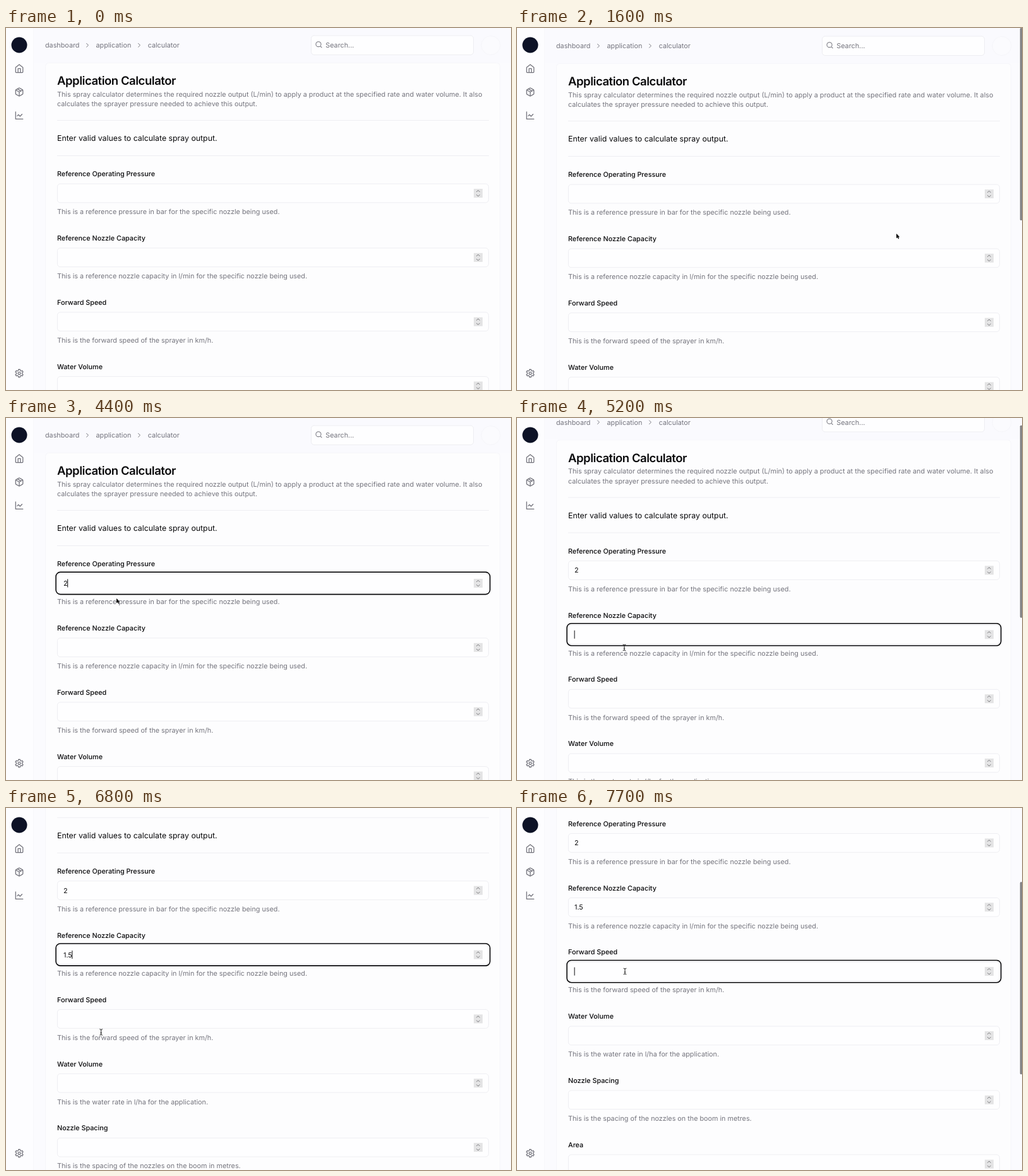
An HTML page for the animation above (8 s loop, 800x574 px).

```html
<!DOCTYPE html>
<html lang="en">
<head>
<meta charset="utf-8">
<title>Application Calculator</title>
<style>
  html, body { margin: 0; width: 100%; height: 100%; overflow: hidden; background: #fbfbfe; }
  svg { display: block; width: 100%; height: 100%; }
  text { font: 400 10.79px Inter, sans-serif; fill: #09090b; text-rendering: geometricPrecision; white-space: pre; }
  .muted { fill: #74747d; }
  .label { font-weight: 500; }
  .lead { font-size: 12.33px; }
  .title { font-size: 18.5px; font-weight: 600; letter-spacing: -.025em; }
  .icon { fill: none; stroke: #71717a; stroke-width: 2; stroke-linecap: round; stroke-linejoin: round; }
  .edge { fill: #fefeff; stroke: #eeeef2; }
  .rule { stroke: #eeeef2; }
</style>
</head>
<body>
<svg id="stage" viewBox="0 0 800 574">
  <rect width="800" height="574" fill="#fbfbfe"/>
  <g id="page">
    <rect x="43" y="-20" width="757" height="75" fill="#fafafe"/>
    <rect x="62.5" y="55.5" width="720" height="1000" rx="5" fill="#fdfdfe" stroke="#f6f6fa"/>
    <rect class="edge" x="483.5" y="12" width="257" height="30.5" rx="4.6"/>
    <circle cx="768" cy="27.5" r="15" fill="#fbfbfe" stroke="#f6f6fa"/>
    <text class="muted" x="62" y="31.2">dashboard</text>
    <text class="muted" x="142.5" y="31.2">application</text>
    <text class="muted" x="224.7" y="31.2">calculator</text>
    <text class="muted" x="506.3" y="31.2">Search...</text>
    <text class="title" x="81" y="90.3">Application Calculator</text>
    <text class="muted" x="81" y="108.9">This spray calculator determines the required nozzle output (L/min) to apply a product at the specified rate and water volume. It also</text>
    <text class="muted" x="81" y="124.4">calculates the sprayer pressure needed to achieve this output.</text>
    <path class="rule" d="M81 146.5H765M81 202.5H765"/>
    <text class="lead" x="81" y="179.4">Enter valid values to calculate spray output.</text>
    <g id="fields"></g>
    <rect id="ring" x="79.1" width="687.6" height="35.2" rx="7" fill="none" stroke="#09090b" stroke-width="1.6"/>
    <rect id="caret" width="1" height="13" fill="#09090b"/>
  </g>
  <rect width="43" height="574" fill="#fdfdff"/>
  <path d="M43.5 0V574" stroke="#f7f7fb"/>
  <circle cx="21" cy="27" r="12.5" fill="#0d1226"/>
  <g id="sidebar"></g>
  <rect id="thumb" x="796.8" width="4" height="305" rx="1.6" fill="#858587"/>
  <g id="pointer" stroke-linejoin="round">
    <path id="arrow" transform="scale(.88)" d="M0 0V8.6L2 6.8 3.5 9.8 4.9 9.1 3.5 6.3H6Z" fill="#000" stroke="#fff" stroke-width=".7" paint-order="stroke"/>
    <path id="beam" d="M-2.3-4.8Q0-4.8 0-3.4Q0-4.8 2.3-4.8M0-3.8V3.8M-2.3 4.8Q0 4.8 0 3.4Q0 4.8 2.3 4.8M-1.2 1.2H1.2" fill="none" stroke="#222"/>
  </g>
</svg>
<script>
const $ = id => document.getElementById(id);
const LOOP = 8000, STEP = 100, KEY_DELAY = 200, BLINK = 600, TRAVEL = 400;
const fieldY = i => 262 + i * 101.85;

const fields = [
  { label: 'Reference Operating Pressure', hint: 'This is a reference pressure in bar for the specific nozzle being used.',
    focusAt: 3600, typeAt: 4200, text: '2' },
  { label: 'Reference Nozzle Capacity', hint: 'This is a reference nozzle capacity in l/min for the specific nozzle being used.',
    focusAt: 5000, typeAt: 6200, text: '1.5' },
  { label: 'Forward Speed', hint: 'This is the forward speed of the sprayer in km/h.', focusAt: 7600 },
  { label: 'Water Volume', hint: 'This is the water rate in l/ha for the application.' },
  { label: 'Nozzle Spacing', hint: 'This is the spacing of the nozzles on the boom in metres.' },
  { label: 'Area', hint: 'This is the area to be sprayed in hectares.' }
];
$('fields').innerHTML = fields.map(({ label, hint }, i) => `
  <g transform="translate(0 ${fieldY(i)})">
    <text class="label" x="81" y="-26.7">${label}</text>
    <rect class="edge" x="81.4" y="-14.9" width="683" height="29.8" rx="4.6"/>
    <text class="value" x="91" y="4"></text>
    <rect x="741" y="-7" width="14" height="14" fill="#e4e4e5"/>
    <path d="M745.2-2l2.7-2.7 2.7 2.7M745.2 2.2l2.7 2.7 2.7-2.7" fill="none" stroke="#77777a"/>
    <text class="muted" x="81" y="33.4">${hint}</text>
  </g>`).join('');
const values = [...document.querySelectorAll('.value')];

// Icons live on a 24-unit grid, centred on (x, y).
const icon = (x, y, size, d) =>
  `<path class="icon" transform="translate(${x} ${y}) scale(${size / 24}) translate(-12 -12)" d="${d}"/>`;

function gearPath() {
  const halfTooth = [[12, 10], [16, 7.9], [29, 6.9]];
  const profile = [...halfTooth.map(([deg, r]) => [-deg, r]).reverse(), ...halfTooth];
  const points = [];
  for (let tooth = 0; tooth < 6; tooth++)
    for (const [deg, r] of profile) {
      const a = (tooth * 60 + deg - 90) * Math.PI / 180;
      points.push(`${12 + r * Math.cos(a)} ${12 + r * Math.sin(a)}`);
    }
  return `M${points.join('L')}ZM9 12a3 3 0 1 0 6 0a3 3 0 1 0-6 0`;
}

const chevron = 'm9 18 6-6-6-6';
$('page').insertAdjacentHTML('beforeend',
  icon(129, 27.3, 11.5, chevron) + icon(211, 27.3, 11.5, chevron) +
  icon(495.5, 26.3, 12.2, 'M3 11a8 8 0 1 0 16 0a8 8 0 1 0-16 0M21 21l-4.3-4.3'));
$('sidebar').innerHTML = [
  'm3 9 9-7 9 7v11a2 2 0 0 1-2 2H5a2 2 0 0 1-2-2zM9 22V12h6v10',
  'M7.5 4.3l9 5.1M11 2.3L4 6.3Q3 7 3 8v8q0 1 1 1.7l7 4q1 .5 2 0l7-4q1-.7 1-1.7V8q0-1-1-1.7l-7-4q-1-.5-2 0M3.3 7l8.7 5 8.7-5M12 22V12',
  'M3 3v18h18M19 9l-5 5-4-4-3 3'
].map((d, i) => icon(21, 64.3 + i * 37.2, 15.3, d)).join('') + icon(21, 547.5, 15.3, gearPath());

const progress = (t, from, to) => Math.min(1, Math.max(0, (t - from) / (to - from)));
const smooth = k => k * k * (3 - 2 * k);
const settle = k => 1 - (1 - k) ** 4.5;
const show = (id, on) => $(id).setAttribute('visibility', on ? 'visible' : 'hidden');

// A small overscroll bounce, a smooth scroll, then a quick flick.
function scrollAt(t) {
  const bounce = t >= 1200 && t < 2000 ? 4 * Math.exp((1200 - t) / 290) : 0;
  return 131.3 * smooth(progress(t, 5000, 5800)) + 75.3 * settle(progress(t, 6900, 7500)) - bounce;
}
function thumbOpacity(t) {
  const lit = (from, to) => t < from ? 0 : 1 - progress(t, to, to + 300);
  return Math.max(lit(1200, 2200), lit(5000, 6200), lit(7000, LOOP));
}

// Stops of the pointer, each reached after a short eased move.
const stops = [
  { at: 1100, x: 601, y: 326 }, { at: 2400, x: 243, y: 185 },
  { at: 3400, x: 167, y: 262 }, { at: 4400, x: 175, y: 286 },
  { at: 4800, x: 170, y: 364 }, { at: 5800, x: 145, y: 362 },
  { at: 7100, x: 181, y: 320 }, { at: 7700, x: 171, y: 259 }
];
function pointerAt(t) {
  return stops.reduce((p, { at, x, y }) => {
    const k = smooth(progress(t, at - TRAVEL, at));
    return { x: p.x + (x - p.x) * k, y: p.y + (y - p.y) * k };
  }, { x: 470, y: 400 });
}

function render(t) {
  const scroll = scrollAt(t);
  $('page').setAttribute('transform', `translate(0 ${-scroll})`);
  $('thumb').setAttribute('y', Math.max(0, scroll * .568));
  $('thumb').setAttribute('opacity', thumbOpacity(t));

  let active = -1, caretSince = 0, typing = false;
  fields.forEach(({ focusAt, typeAt, text = '' }, i) => {
    const typed = t >= typeAt ? Math.min(text.length, Math.floor((t - typeAt) / KEY_DELAY) + 1) : 0;
    values[i].textContent = text.slice(0, typed);
    typing ||= t >= typeAt && t < typeAt + text.length * KEY_DELAY;
    if (t >= focusAt) {
      active = i;
      caretSince = typed ? typeAt + (typed - 1) * KEY_DELAY : focusAt;
    }
  });

  const focused = active >= 0;
  show('ring', focused);
  show('caret', focused && (t - caretSince) % (2 * BLINK) < BLINK);
  if (focused) {
    const y = fieldY(active), value = values[active];
    $('ring').setAttribute('y', y - 17.6);
    $('caret').setAttribute('y', y - 6.5);
    $('caret').setAttribute('x', 90.6 + (value.textContent ? value.getComputedTextLength() : 0));
  }

  const { x, y } = pointerAt(t);
  const visible = t >= 300 && !typing;
  const overText = t >= 3300 && (t < 4200 || t >= 4500);
  $('pointer').setAttribute('transform', `translate(${x} ${y})`);
  show('arrow', visible && !overText);
  show('beam', visible && overText);
}

const start = performance.now();
function tick() {
  const t = (performance.now() - start) % LOOP;
  render(Math.floor(t / STEP) * STEP);
  requestAnimationFrame(tick);
}
tick();
</script>
</body>
</html>
```
